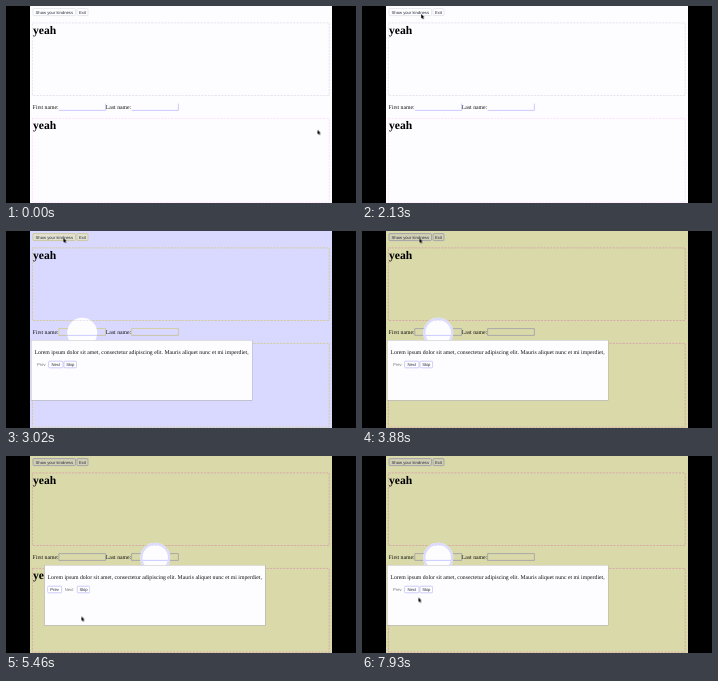
Animation, 350 px wide and 197 px high, one loop 8 s. Source, as an HTML page:

```html
<!DOCTYPE html>
<html lang="en">
<head>
<meta charset="utf-8">
<title>Guided tour</title>
<style>
html, body { margin: 0; width: 100%; height: 100%; overflow: hidden; background: #000; }
svg { display: block; width: 100vw; height: 100vh; }
text { font: 5.77px "Liberation Serif", serif; text-rendering: geometricPrecision; fill: #111; }
.title { font-size: 11.6px; font-weight: bold; fill: #000; }
.button text { font: 4.2px "Liberation Sans", sans-serif; text-anchor: middle; fill: #292942; }
.button rect { fill: var(--face); stroke: var(--edge); stroke-width: .7; }
.off text { fill: #777; }
.pressed rect { fill: #246dff; stroke: #246dff; }
.pressed text { fill: #002a80; }
.box, .field { fill: none; stroke-width: .7; }
.box { stroke-dasharray: 2.2 1.1; }
.one { stroke: var(--dash); }
.two { stroke: var(--dash2); }
.field { stroke: var(--field); }
.rim { stroke: var(--rim); }

/* The overlay darkens in two hard steps: light, mist, dim. */
.light { --paper: #fdfcff; --dash: #e1dce9; --dash2: #ffd9ff; --field: #b8b6ff; --rim: none; --face: #fff; --edge: #dedee8; }
.mist { --paper: #d9d9ff; --dash: #d0c878; --dash2: #d0c878; --field: #c4bc80; --rim: #d0c878; --face: #e2e2d0; --edge: #c8c080; }
.dim { --paper: #dad9aa; --dash: #d69baa; --dash2: #d69baa; --field: #9595aa; --rim: #9595aa; --face: #d2d1b4; --edge: #9090a8; }

.mist, .dim, .popup, .slide, .cursor, .step1, .step2, .press { animation: 8s linear infinite; }
.mist, .dim, .step1, .step2, .press { animation-timing-function: step-end; }
.mist { animation-name: mist; }
.dim { animation-name: dim; }
.popup { animation-name: appear; }
.hole { animation-name: slide-hole; }
.card { animation-name: slide-card; }
.cursor { animation-name: cursor; }
.step1 { animation-name: step1; }
.step2 { animation-name: step2; }
.show { animation-name: press-show; }
.next { animation-name: press-next; }
.prev { animation-name: press-prev; }

@keyframes mist { 0% { opacity: 0; } 34.6% { opacity: 1; } 38.6%, 100% { opacity: 0; } }
@keyframes dim { 0% { opacity: 0; } 38.6%, 100% { opacity: 1; } }
@keyframes appear { 0%, 32.7% { opacity: 0; } 37.5%, 100% { opacity: 1; } }
@keyframes slide-hole {
  0%, 58.8% { transform: translateX(0); animation-timing-function: ease; }
  65.1% { transform: translateX(73px); }
  88.7% { transform: translateX(73px); animation-timing-function: ease; }
  95%, 100% { transform: translateX(0); }
}
@keyframes slide-card {
  0%, 58.8% { transform: translateX(0); animation-timing-function: ease; }
  65.1% { transform: translateX(13.2px); }
  88.7% { transform: translateX(13.2px); animation-timing-function: ease; }
  95%, 100% { transform: translateX(0); }
}
@keyframes step1 { 0% { opacity: 1; } 58.8% { opacity: 0; } 88.7%, 100% { opacity: 1; } }
@keyframes step2 { 0% { opacity: 0; } 58.8% { opacity: 1; } 88.7%, 100% { opacity: 0; } }
@keyframes press-show { 0% { opacity: 0; } 30.7% { opacity: 1; } 32.7%, 100% { opacity: 0; } }
@keyframes press-next { 0% { opacity: 0; } 57.8% { opacity: 1; } 58.8%, 100% { opacity: 0; } }
@keyframes press-prev { 0% { opacity: 0; } 86.3% { opacity: 1; } 88.7%, 100% { opacity: 0; } }
@keyframes cursor {
  0%, 11.2% { transform: translate(311.5px, 123.8px); animation-timing-function: ease-in-out; }
  17.1%, 21.3% { transform: translate(74px, 17px); animation-timing-function: ease-out; }
  26.6% { transform: translate(59.2px, 8px); }
  30.7%, 48.2% { transform: translate(57.4px, 7px); animation-timing-function: ease-in-out; }
  57.5%, 60% { transform: translate(49px, 130.4px); animation-timing-function: ease-in-out; }
  68.2%, 77.8% { transform: translate(75.4px, 160.4px); animation-timing-function: ease-in-out; }
  86%, 96.2% { transform: translate(49px, 130.4px); animation-timing-function: ease-out; }
  99.1%, 100% { transform: translate(56.4px, 141.5px); }
}
</style>
</head>
<body>
<svg viewBox="0 0 350 197" preserveAspectRatio="none">
  <defs>
    <g id="page">
      <rect x="24" width="302" height="197" fill="var(--paper)"/>
      <g class="button">
        <rect x="27" y="2.6" width="42.5" height="7" rx="1"/><text x="48.3" y="7.5">Show your kindness</text>
        <rect x="71" y="2.6" width="11" height="7" rx="1"/><text x="76.5" y="7.5">Exit</text>
      </g>
      <rect class="box one" x="26.4" y="16.9" width="296.8" height="72.6"/>
      <rect class="box two" x="26.4" y="112.4" width="296.8" height="83.8"/>
      <text class="title" x="27" y="27.7">yeah</text>
      <text class="title" x="27" y="123.2">yeah</text>
      <text x="26.6" y="103">First name:</text>
      <text x="99.8" y="103">Last name:</text>
      <path class="field rim" d="M52.8 104.4V97.6H99.6M125.6 104.4V97.6H172.4"/>
      <path class="field" d="M52.8 104.4H99.6V97.6M125.6 104.4H172.4V97.6"/>
    </g>
    <mask id="spotlight" maskUnits="userSpaceOnUse" x="0" y="0" width="350" height="197">
      <rect width="350" height="197" fill="#fff"/>
      <circle class="slide hole" cx="76.2" cy="101.8" r="15"/>
    </mask>
    <clipPath id="screen"><rect x="24" width="302" height="197"/></clipPath>
  </defs>

  <rect width="350" height="197"/>
  <g clip-path="url(#screen)">
    <use class="light" href="#page"/>
    <g class="button pressed press show">
      <rect x="27" y="2.6" width="42.5" height="7" rx="1"/><text x="48.3" y="7.5">Show your kindness</text>
    </g>
    <g mask="url(#spotlight)">
      <use class="mist" href="#page"/>
      <use class="dim" href="#page"/>
    </g>
    <g class="dim">
      <circle class="slide hole" cx="76.2" cy="101.8" r="13.9" fill="none" stroke="#dbdbff" stroke-width="2.2"/>
    </g>

    <g class="popup" style="--face:#fff;--edge:#b8b6f4">
      <g class="slide card">
        <rect x="25.2" y="109.2" width="221" height="60.3" fill="#fdfcff" style="filter:drop-shadow(0 .4px .7px #000b)"/>
        <text x="28.4" y="123">Lorem ipsum dolor sit amet, consectetur adipiscing elit. Mauris aliquet nunc et mi imperdiet,</text>
        <g class="step1">
          <g class="button off"><text x="35.4" y="135">Prev</text></g>
          <g class="button"><rect x="42.6" y="130.2" width="14.4" height="6.6" rx="1"/><text x="49.8" y="135">Next</text></g>
        </g>
        <g class="step2">
          <g class="button"><rect x="28.4" y="130.2" width="14" height="6.6" rx="1"/><text x="35.4" y="135">Prev</text></g>
          <g class="button off"><text x="49.8" y="135">Next</text></g>
        </g>
        <g class="button"><rect x="58" y="130.2" width="12.6" height="6.6" rx="1"/><text x="64.3" y="135">Skip</text></g>
        <g class="button pressed press next"><rect x="42.6" y="130.2" width="14.4" height="6.6" rx="1"/><text x="49.8" y="135">Next</text></g>
        <g class="button pressed press prev"><rect x="28.4" y="130.2" width="14" height="6.6" rx="1"/><text x="35.4" y="135">Prev</text></g>
      </g>
    </g>
    <path class="cursor" d="M0 0V4.4L1 3.5 1.8 5.2 2.7 4.9 1.9 3.2H3.2Z" fill="#000" stroke="#fff" stroke-width=".4" paint-order="stroke"/>
  </g>
</svg>
</body>
</html>
```
